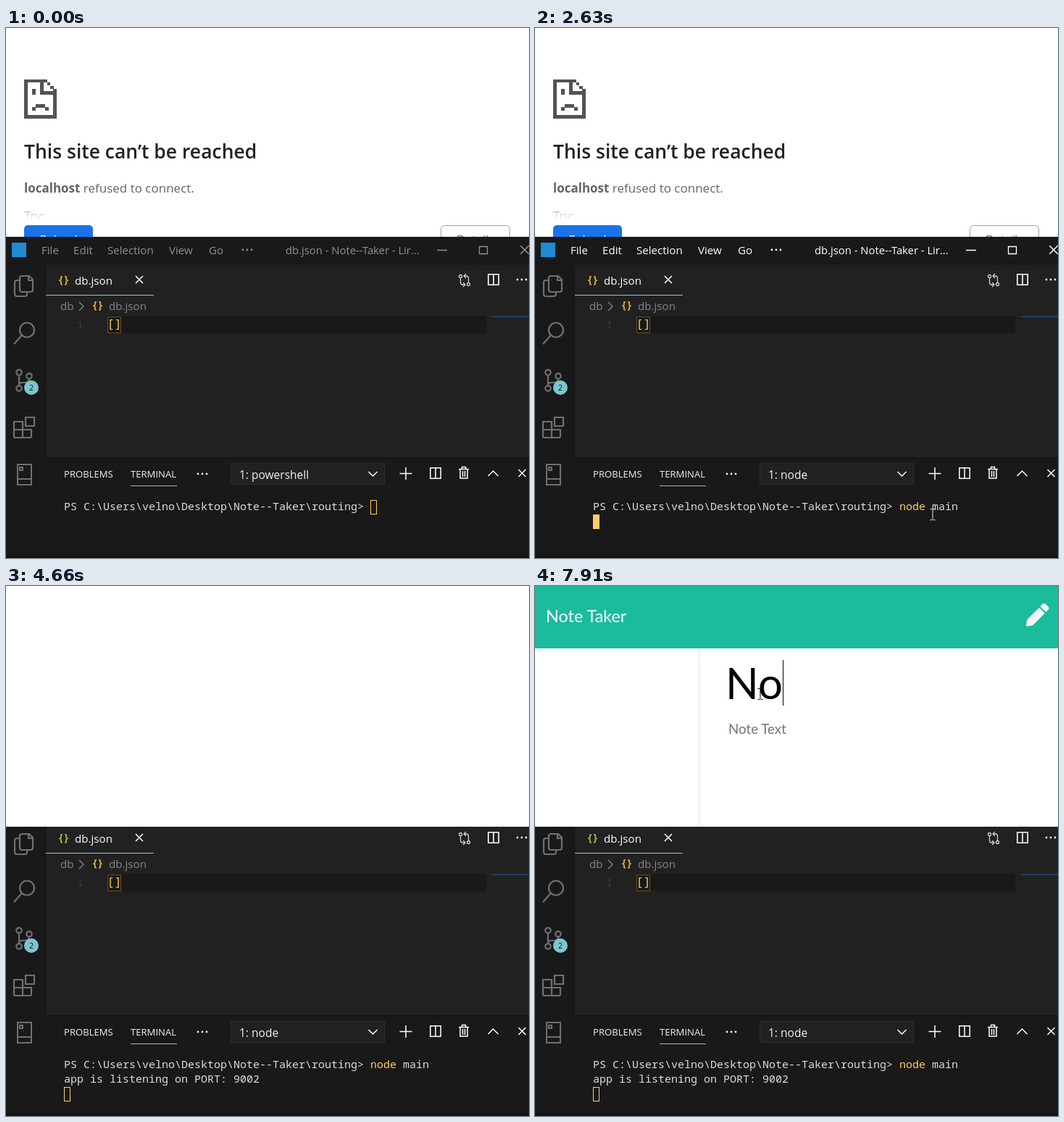
These frames come from a looping animation (722x731 px, 7.99 s). An HTML page:

```html
<!DOCTYPE html>
<html lang="en">
<head>
<meta charset="utf-8">
<title>Note Taker demo</title>
<style>
  html, body { margin: 0; width: 100%; height: 100%; overflow: hidden; background: #fff; }
  svg { display: block; width: 722px; height: 731px; }
  text { white-space: pre; }
  .ui { font: 15.1px "Open Sans", sans-serif; }
  .mono { font: 15px "Noto Sans Mono", monospace; }
  .lato { font-family: Lato, sans-serif; }
  .line { fill: none; stroke: currentColor; }
  .yellow { fill: #fc6; }
  .code { fill: #dcdcdc; }

  /* One 7990 ms clock; every change is a hard step. */
  .anim { animation: 7990ms step-end infinite; }
  #error { animation-name: error; }
  #notes { animation-name: notes; }
  #titlebar { animation-name: titlebar; }
  #menu { animation-name: menu; }
  #tabIcon { animation-name: tab-icon; }
  #shell { animation-name: shell; }
  #node { animation-name: node; }
  #output { animation-name: output; }
  #cursor { animation-name: cursor; }
  #block { animation-name: block; }
  #hint { animation-name: hint; }
  #keyN { animation-name: key-n; }
  #keyO { animation-name: key-o; }
  #caret { animation-name: caret; }
  #beam { animation-name: beam; }
  #arrow { animation-name: arrow; }
  #darkBeam { animation-name: dark-beam; }

  @keyframes error { 58.32% { visibility: hidden } }
  @keyframes notes { 0% { visibility: hidden } 66.2% { visibility: visible } }
  @keyframes titlebar { 54.31% { visibility: hidden } }
  @keyframes menu { 0% { color: #919191 } 7.75% { color: #fff } }
  @keyframes tab-icon { 0% { fill: #e0ab45 } 54.31% { fill: #a5b94a } }
  @keyframes shell { 32.91% { visibility: hidden } }
  @keyframes node { 0% { visibility: hidden } 32.91% { visibility: visible } }
  @keyframes output { 0% { visibility: hidden } 38.67% { visibility: visible } }
  @keyframes block { 0% { fill: #191919 } 7.75% { fill: #fc6 } 54.31% { fill: #191919 } }
  @keyframes cursor {
    0% { transform: translate(503px, 651px) }
    19.27% { transform: translate(512px, 651px) }
    20.27% { transform: translate(530px, 651px) }
    21.27% { transform: translate(548px, 651px) }
    23.15% { transform: translate(557px, 651px) }
    27.03% { transform: translate(566px, 651px) }
    27.9% { transform: translate(575px, 651px) }
    28.91% { transform: translate(584px, 651px) }
    31.78% { transform: translate(80px, 671px) }
    38.67% { transform: translate(80px, 691px) }
  }
  @keyframes hint { 97.12% { visibility: hidden } }
  @keyframes key-n { 0% { visibility: hidden } 97.12% { visibility: visible } }
  @keyframes key-o { 0% { visibility: hidden } 98.99% { visibility: visible } }
  @keyframes caret {
    0% { visibility: hidden; transform: translateX(265px) }
    85.35% { visibility: visible; transform: translateX(265px) }
    92.11% { visibility: hidden; transform: translateX(265px) }
    97.12% { visibility: visible; transform: translateX(310px) }
    98.99% { visibility: visible; transform: translateX(342px) }
  }
  @keyframes beam {
    0% { visibility: hidden }
    .87% { visibility: visible; transform: translate(587px, 724px) }
    1.87% { visibility: visible; transform: translate(573px, 704px) }
    2.87% { visibility: visible; transform: translate(561px, 689px) }
    3.75% { visibility: visible; transform: translate(556px, 683px) }
    5.88% { visibility: visible; transform: translate(554px, 680px) }
    6.88% { visibility: visible; transform: translate(551px, 675px) }
    7.75% { visibility: visible; transform: translate(549px, 671px) }
    40.8% { visibility: visible; transform: translate(420px, 458px) }
    41.67% { visibility: hidden }
  }
  @keyframes arrow {
    0% { visibility: hidden }
    41.67% { visibility: visible; transform: translate(203px, 114px) }
    42.67% { visibility: hidden }
    78.59% { visibility: visible; transform: translate(161px, 33px) }
    79.59% { visibility: visible; transform: translate(192px, 72px) }
    80.6% { visibility: visible; transform: translate(236px, 118px) }
    81.47% { visibility: hidden }
  }
  @keyframes dark-beam {
    0% { visibility: hidden }
    81.47% { visibility: visible; transform: translate(272px, 146px) }
    82.47% { visibility: visible; transform: translate(290px, 158px) }
    83.47% { visibility: visible; transform: translate(309px, 166px) }
    84.48% { visibility: visible; transform: translate(319px, 162px) }
    85.35% { visibility: visible; transform: translate(314px, 153px) }
    86.35% { visibility: visible; transform: translate(311px, 149px) }
  }
</style>
</head>
<body>
<svg viewBox="0 0 722 731">
  <defs>
    <linearGradient id="fade" x2="0" y2="1">
      <stop offset="0" stop-color="#fff" stop-opacity=".3"/>
      <stop offset="1" stop-color="#fff"/>
    </linearGradient>
    <g id="dots"><circle cx="2" r="1.4"/><circle cx="8" r="1.4"/><circle cx="14" r="1.4"/></g>
    <path id="cross" class="line" d="M-5-5 5 5M5-5-5 5"/>
    <path id="split" class="line" d="M.8.8h14.4v14.4H.8zM8 0v16"/>
    <path id="ibeam" class="line" d="M-3.5-7.5H-1L0-6.5 1-7.5H3.5M0-6.5V6.5M-3.5 7.5H-1L0 6.5 1 7.5H3.5"/>
  </defs>

  <rect width="722" height="332" fill="#fff"/>

  <g id="error" class="anim ui">
    <path fill="#535353" d="M25 71h32v4h4v5h5v4h4v41H25zM30 75v45h35V92H47V75zM52 75v12h13v-3h-4v-5h-4v-4zM36 84h5v8h-5zM41 105h13v4h5v5h-5v-4H41v4h-5v-5h5z" fill-rule="evenodd"/>
    <text x="25" y="180" font-size="26.5" font-weight="600" fill="#202124">This site can’t be reached</text>
    <text x="25" y="227" font-size="17" fill="#646464"><tspan font-weight="700">localhost</tspan> refused to connect.</text>
    <text x="25" y="265" font-size="17" fill="#646464">Try:</text>
    <rect x="20" y="246" width="60" height="19" fill="url(#fade)"/>
    <rect x="20" y="265" width="60" height="7" fill="#fff"/>
    <rect x="25" y="272" width="95" height="44" rx="5" fill="#1a73e8"/>
    <text x="72.5" y="298" font-size="16.3" text-anchor="middle" fill="#fff">Reload</text>
    <rect x="600.5" y="272.5" width="95" height="43" rx="5" fill="#fff" stroke="#9aa0a6"/>
    <text x="648" y="298" font-size="16.3" text-anchor="middle" fill="#5f6368">Details</text>
  </g>

  <g id="notes" class="anim lato">
    <rect width="722" height="86" fill="#1abc9c"/>
    <text x="15" y="49.5" font-size="23.4" fill="#fff">Note Taker</text>
    <path transform="translate(678 24) scale(.0615)" fill="#f4f4f4" d="M497.9 142.1l-46.1 46.1c-4.7 4.7-12.3 4.7-17 0l-111-111c-4.7-4.7-4.7-12.3 0-17l46.1-46.1c18.7-18.7 49.1-18.7 67.9 0l60.1 60.1c18.8 18.7 18.8 49.1 0 67.9zM284.2 99.8L21.6 362.4.4 483.9c-2.9 16.4 11.4 30.6 27.8 27.8l121.5-21.3 262.6-262.6c4.7-4.7 4.7-12.3 0-17l-111-111c-4.8-4.7-12.4-4.7-17.1 0z"/>
    <path d="M226.5 86V332" stroke="#dee2e6"/>
    <text id="hint" class="anim" x="263" y="156" font-size="60" fill="#757575">Note Title</text>
    <text x="263" y="156" font-size="60"><tspan id="keyN" class="anim">N</tspan><tspan id="keyO" class="anim">o</tspan></text>
    <text x="267" y="203.5" font-size="18.75" fill="#6f7779">Note Text</text>
  </g>
  <path id="caret" class="anim" d="M.5 102V165" stroke="#000"/>

  <g class="ui">
    <rect y="332" width="722" height="399" fill="#212121"/>
    <rect y="332" width="55" height="399" fill="#191919"/>
    <rect x="55" y="593" width="667" height="138" fill="#191919"/>
    <path d="M54.5 332V728M55 592.5H722" stroke="#131313"/>
    <rect y="728" width="722" height="3" fill="#121212"/>

    <g id="titlebar" class="anim">
      <rect y="288" width="722" height="44" fill="#191919"/>
      <rect x="55" y="326" width="667" height="6" fill="#212121"/>
      <path d="M0 325.5H722M54.5 326V332" stroke="#121212"/>
      <rect x="8" y="296" width="20" height="20" fill="#1f8ad2"/>
      <g id="menu" class="anim" fill="currentColor">
        <text x="49" y="312">File</text>
        <text x="93" y="312">Edit</text>
        <text x="140" y="312">Selection</text>
        <text x="225" y="312">View</text>
        <text x="280" y="312">Go</text>
        <use href="#dots" x="325" y="306"/>
        <text x="386" y="312" font-size="14.8">db.json - Note--Taker - Lir...</text>
        <path class="line" stroke-width="1.3" d="M595 306.5h14M653.5 301.5h11v10h-11z"/>
        <use href="#cross" transform="translate(716 306) scale(1.15)" stroke-width="1.3"/>
      </g>
    </g>

    <!-- activity bar -->
    <g class="line" color="#707070" stroke-width="2.2">
      <path d="M19 348h-4q-3 0-3 3v16q0 3 3 3h11q3 0 3-3v-3M22 342h10l5 5v14q0 3-3 3H22q-3 0-3-3V345q0-3 3-3zM31 342v6h6"/>
      <circle cx="29" cy="416.5" r="10"/><path d="M22 423.5 11 436"/>
      <circle cx="18" cy="475" r="3.7"/><circle cx="18" cy="497" r="3.7"/><circle cx="32" cy="480" r="3.7"/>
      <path d="M18 479v14M32 484q0 5-6 5h-3q-5 0-5 4"/>
      <path d="M11 543h12v22H13q-2 0-2-2zM11 554h24v9q0 2-2 2H23M27 537h12v12H27z"/>
      <path stroke-width="2" d="M16 602h19v28H16zM16 622h19M19 606h4v4h-4z"/>
    </g>
    <circle cx="35" cy="496" r="10" fill="#7cc5cf"/>
    <text x="35" y="500" font-size="10.5" text-anchor="middle" fill="#151515">2</text>

    <!-- tab, breadcrumb and code -->
    <path d="M55 368.5H204" stroke="#80cbd3"/>
    <text id="tabIcon" class="anim" x="73" y="352" font-size="14" font-weight="700" letter-spacing="2">{}</text>
    <text x="95" y="354" fill="#fff">db.json</text>
    <use href="#cross" x="184" y="347" color="#fff" stroke-width="1.5"/>
    <g fill="#868686">
      <text x="75" y="389">db</text>
      <text x="142" y="389">db.json</text>
    </g>
    <path class="line" color="#868686" stroke-width="1.4" d="M101 378l6 6-6 6"/>
    <text x="120" y="387" font-size="14" font-weight="700" letter-spacing="2" fill="#e0ab45">{}</text>
    <rect x="140" y="397" width="523" height="24" fill="#191919"/>
    <rect x="140.5" y="398.5" width="18" height="22" fill="none" stroke="#6a5020"/>
    <text class="yellow" x="142" y="414" font-size="17" letter-spacing="4">[]</text>
    <text class="mono" x="98" y="414" fill="#3c3c3c">1</text>
    <rect x="671" y="397" width="51" height="2" fill="#1f4260"/>
    <g color="#d0d0d0" stroke-width="1.3">
      <g class="line">
        <circle cx="627.5" cy="342.5" r="2"/><circle cx="638.5" cy="353.5" r="2"/>
        <path d="M627.5 345v6q0 3 3 3h3M631 351l3 3-3 3M638.5 351v-6q0-3-3-3h-3M635 339l-3 3 3 3"/>
      </g>
      <use href="#split" x="665" y="339" color="#fff" stroke-width="1.6"/>
    </g>
    <use href="#dots" x="704" y="347" fill="#eee"/>

    <!-- panel header -->
    <g fill="#f0f0f0" font-size="13.1" font-weight="500">
      <text x="80" y="620">PROBLEMS</text>
      <text x="172" y="620">TERMINAL</text>
    </g>
    <path d="M172 631.5H236" stroke="#80cbd3"/>
    <use href="#dots" x="263" y="615" fill="#eee"/>
    <rect x="310.5" y="600.5" width="212" height="29" fill="#212121" stroke="#2e2e2e"/>
    <g fill="#f0f0f0" font-size="15.5">
      <text id="shell" class="anim" x="322" y="622">1: powershell</text>
      <text id="node" class="anim" x="322" y="622">1: node</text>
    </g>
    <g class="line" color="#fff" stroke-width="1.5">
      <path d="M500.5 612l6 6 6-6M552 606v17M543.5 614.5h17M665.5 618l7-7 7 7"/>
      <path d="M625 608.5h14M629.5 608v-2.5h5v2.5M627 609v12h10v-12M630.5 611v8M633.5 611v8"/>
      <use href="#split" x="585" y="606"/>
      <use href="#cross" x="712.5" y="614"/>
    </g>
  </g>

  <!-- terminal -->
  <g class="mono code">
    <text x="80" y="665">PS C:\Users\velno\Desktop\Note--Taker\routing> <tspan class="yellow">node</tspan> main</text>
    <text id="output" class="anim" x="80" y="685">app is listening on PORT: 9002</text>
  </g>
  <g id="cursor" class="anim">
    <rect width="90" height="20" fill="#191919"/>
    <rect id="block" class="anim" x=".5" y=".5" width="8" height="19" stroke="#fc6"/>
  </g>

  <!-- mouse pointers -->
  <use id="beam" class="anim" href="#ibeam" color="#e6e6e6"/>
  <use id="darkBeam" class="anim" href="#ibeam" color="#000"/>
  <path id="arrow" class="anim" d="M.5.5v16l3.8-3.6 2.4 5.6 2.2-1-2.4-5.4h5.2z" fill="#fff" stroke="#000"/>
</svg>
</body>
</html>
```
